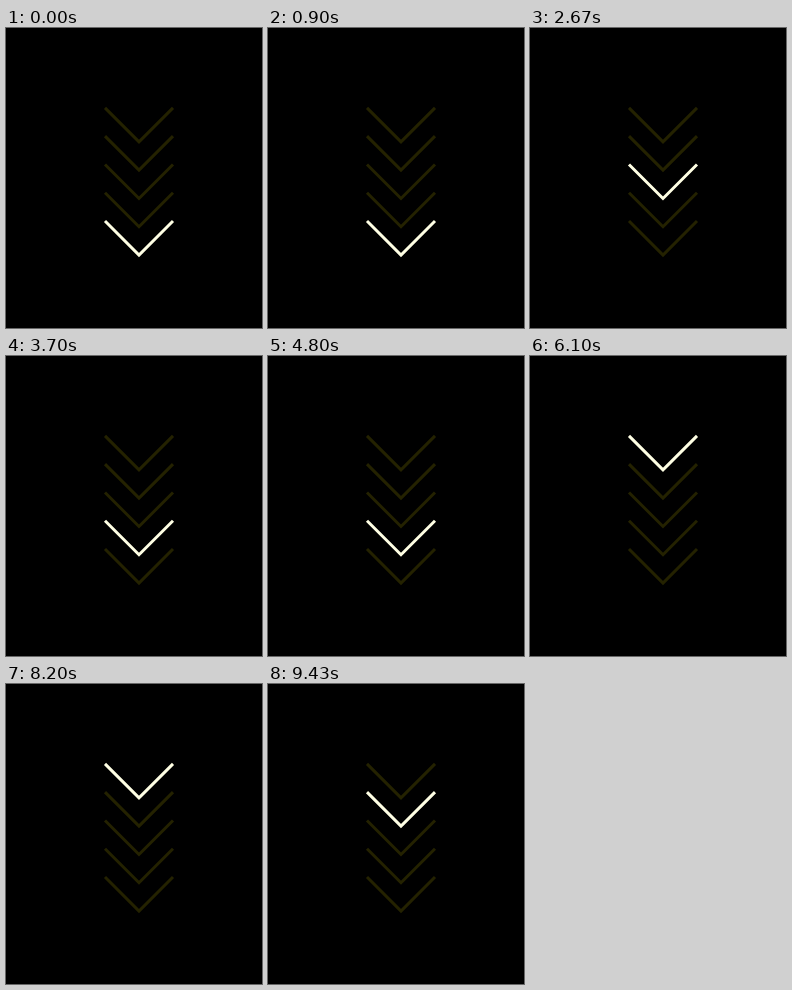
An HTML page with a canvas that plays this animation: 256x300 px, repeating every 9460 ms.

```html
<!DOCTYPE html>
<html lang="en">
<head>
<meta charset="utf-8">
<title>Chevrons</title>
<style>
  html, body { margin: 0; width: 100%; height: 100%; overflow: hidden; background: #000; }
  canvas { display: block; }
</style>
</head>
<body>
<canvas id="stage" width="256" height="300"></canvas>
<script>
const ctx = document.getElementById('stage').getContext('2d');

const LOOP = 9460;   // ms
const STEP = 200;    // ms each chevron stays lit
const LEAD = 900;    // phase: the last chevron is lit from -100 ms to 100 ms
const COUNT = 5;
const CENTER = 133;
const ARM = 34;
const TOP = 79.9;
const GAP = 28.28;
const DIM = '#242200';
const LIT = '#ffffe4';

function chevron(index, color) {
  const y = TOP + index * GAP;
  ctx.strokeStyle = color;
  ctx.beginPath();
  ctx.moveTo(CENTER - ARM, y);
  ctx.lineTo(CENTER, y + ARM);
  ctx.lineTo(CENTER + ARM, y);
  ctx.stroke();
}

function draw(time) {
  const lit = Math.floor((time % LOOP + LEAD) / STEP) % COUNT;
  ctx.fillStyle = '#000';
  ctx.fillRect(0, 0, 256, 300);
  ctx.lineWidth = 3;
  ctx.lineJoin = 'miter';
  for (let i = 0; i < COUNT; i++) chevron(i, i === lit ? LIT : DIM);
}

const start = performance.now();
function tick() {
  draw(performance.now() - start);
  requestAnimationFrame(tick);
}
tick();
</script>
</body>
</html>
```
